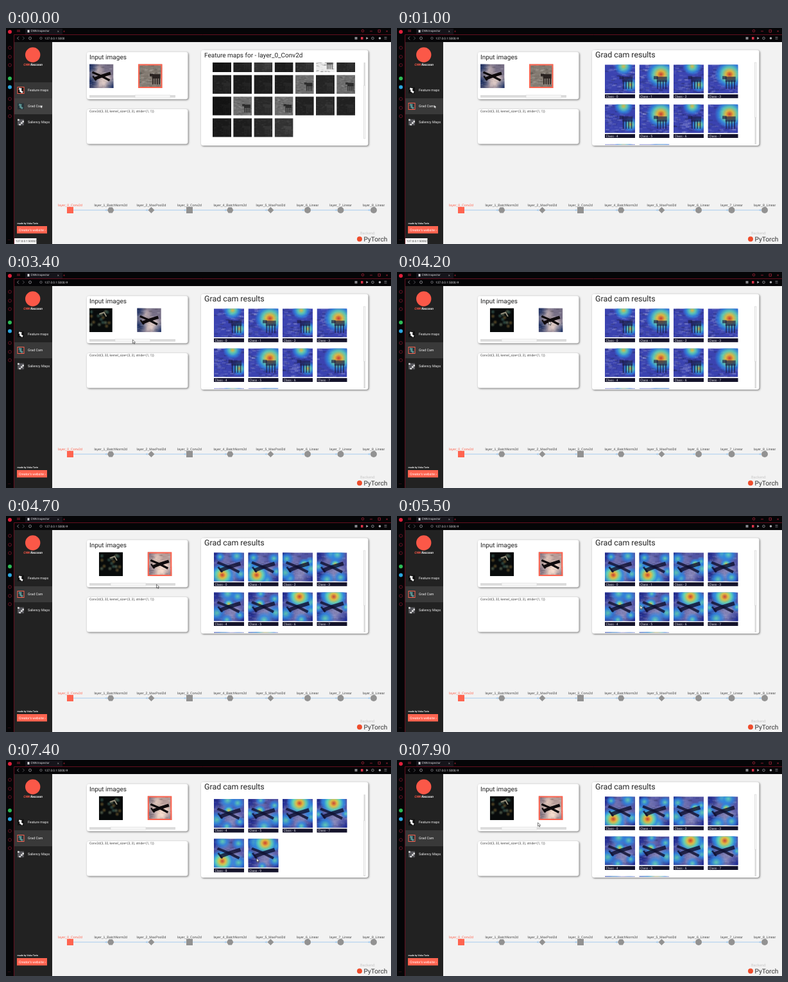
An HTML page with a canvas for the animation above (8000 ms loop, 600 px wide and 338 px high).

```html
<!DOCTYPE html>
<html lang="en">
<head>
<meta charset="utf-8">
<title>CNN Inspector</title>
<style>
html, body { margin: 0; width: 100%; height: 100%; overflow: hidden; background: #000; }
canvas { display: block; }
</style>
</head>
<body>
<canvas id="stage" width="600" height="338"></canvas>
<script>
const c = document.getElementById('stage').getContext('2d');
const LOOP = 8000, RED = '#ff6450';
const ROBOTO = 'Roboto, sans-serif', ARIAL = '"Liberation Sans", sans-serif';
const OPEN_RESULTS = 500, DRAG_START = 2600, DRAG_END = 3700, PICK_PLANE = 4250;
const JET = ['#e53a1c', '#f8cb30', '#62dcb4', '#2f86e0'];

// Keyframes: time followed by values
const cursorKeys = [[0, 55, 123], [900, 55, 123], [2000, 226, 126], [DRAG_START, 230, 109],
  [DRAG_END, 192, 109], [4200, 238, 80], [4700, 236, 110], [5700, 397, 147], [7500, 392, 157], [7900, 221, 101]];
const scrollKeys = [[5700, 0], [6050, 58.5], [7450, 58.5], [7700, 0]];

function at(keys, t) {
  const i = keys.findIndex(k => t < k[0]);
  if (i < 1) return keys.at(i).slice(1);
  const a = keys[i - 1], b = keys[i];
  const p = (t - a[0]) / (b[0] - a[0]), e = p * p * (3 - 2 * p);
  return a.slice(1).map((v, j) => v + (b[j + 1] - v) * e);
}

function seeded(seed) {
  let s = seed * 99733 + 1234567;
  return () => (s = s * 16807 % 2147483647) / 2147483647;
}

function rect(x, y, w, h, color) { c.fillStyle = color; c.fillRect(x, y, w, h); }

function frame(x, y, w, h, color, width) {
  c.strokeStyle = color; c.lineWidth = width; c.strokeRect(x, y, w, h);
}

function text(s, x, y, size, color, font = ROBOTO, align = 'left', style = '') {
  c.font = `${style} ${size}px ${font}`;
  c.textAlign = align;
  c.fillStyle = color;
  c.fillText(s, x, y);
}

function dot(x, y, r, color) {
  c.beginPath(); c.arc(x, y, r, 0, 7); c.fillStyle = color; c.fill();
}

function ring(x, y, r, color) {
  c.beginPath(); c.arc(x, y, r, 0, 7); c.strokeStyle = color; c.lineWidth = .7; c.stroke();
}

function line(color, width, ...p) {
  c.beginPath();
  for (let i = 0; i < p.length; i += 2) c.lineTo(p[i], p[i + 1]);
  c.strokeStyle = color; c.lineWidth = width; c.stroke();
}

function polygon(x, y, r, sides, color) {
  c.beginPath();
  for (let a = 0; a < sides; a++) c.lineTo(x + r * Math.cos(a * 2 * Math.PI / sides), y + r * Math.sin(a * 2 * Math.PI / sides));
  c.fillStyle = color; c.fill();
}

function clip(x, y, w, h, draw) {
  c.save(); c.beginPath(); c.rect(x, y, w, h); c.clip(); draw(); c.restore();
}

function glow(x, y, r, colors) {
  const g = c.createRadialGradient(x, y, 0, x, y, r);
  colors.forEach((k, i) => g.addColorStop(i / colors.length, k));
  g.addColorStop(1, colors.at(-1).slice(0, 7) + '00');
  rect(x - r, y - r, 2 * r, 2 * r, g);
}

function card(x, y, w, h) {
  c.save();
  c.shadowColor = '#0008'; c.shadowBlur = 3; c.shadowOffsetX = c.shadowOffsetY = 1;
  c.beginPath(); c.roundRect(x, y, w, h, 3.5); c.fillStyle = '#fff'; c.fill();
  c.restore();
}

function scrollbar(x, y, w, h, tx, ty, tw, th) {
  rect(x, y, w, h, '#dcdcdc');
  rect(tx, ty, tw, th, '#f7f7f7');
  frame(tx, ty, tw, th, '#d0d0d0', .5);
}

// Pictures fill the unit square, scaled to the box they stand in
function picture(x, y, w, h, draw) {
  clip(x, y, w, h, () => { c.translate(x, y); c.scale(w, h); draw(); });
}

function grain(seed, strength) {
  const rnd = seeded(seed);
  for (let i = 0; i < 140; i++) {
    const shade = rnd() < .5 ? 0 : 255;
    rect(rnd() - .05, rnd() - .02, .12, .05, `rgba(${shade},${shade},${shade},${rnd() * strength})`);
  }
}

function clouds(color, shade) {
  const rnd = seeded(4);
  for (let i = 0; i < 9; i++) glow(.15 + rnd() * .8, .15 + rnd() * .8, .3, [color + 'a0', color + '60']);
  for (const [x, y] of [[0, .1], [.05, .75], [1, .95]]) glow(x, y, .4, [shade, shade + '90']);
  grain(3, .12);
}

function planeShape(color) {
  line(color, .13, .2, .62, .5, .5, .88, .38);
  line(color, .09, .12, .34, .5, .5, .84, .68);
  line(color, .06, .14, .5, .28, .68);
}

function dogShape(color) {
  rect(.58, .42, .34, .18, color);
  rect(.48, .4, .14, .11, color);
  for (let i = 0; i < 4; i++) rect(.59 + i * .09, .55, .045, .3, color);
}

const photos = {
  plane(picked) {
    rect(0, 0, 1, 1, picked ? '#b79c98' : '#776f86');
    clouds(picked ? '#ffe4d4' : '#ead4cc', picked ? '#7f7080' : '#182d62');
    planeShape('#0f0b0d');
  },
  dog() {
    rect(0, 0, 1, 1, '#857c73');
    grain(8, .16);
    dogShape('#2a2321');
  },
  dark() {
    const rnd = seeded(12), hues = ['#40695f', '#7a6434', '#6d7d64'];
    rect(0, 0, 1, 1, '#080b0b');
    for (let i = 0; i < 15; i++) glow(.1 + rnd() * .8, .08 + rnd() * .7, .1, [hues[i % 3] + 'b0']);
    line('#97927f', .05, .45, .25, .65, .18, .75, .35);
  }
};

// Even dog classes have two small spots, odd ones a single large spot
function dogSpots(n) {
  return n % 2 ? [[.72, .34, .5, 3]] : [[.62, .06, .32, 2], [.84, .7, .26, 2]];
}

// Plane classes share faint spots on the rim; the outer classes also run hot
function planeSpots(n) {
  const rnd = seeded(n + 5), spots = [];
  for (let i = 0; i < 5; i++) {
    const a = i * 1.26 + rnd();
    spots.push([.5 + .46 * Math.cos(a), .5 + .46 * Math.sin(a), .16 + rnd() * .16, 1]);
  }
  if (n > 1 && n < 6) spots.push([.3 + rnd() * .6, .4, .2, 2]);
  else spots.push(n < 2 || n === 8 ? [.28, .78, .42, 3] : [.56, .15, .44, 3]);
  return spots;
}

function heatmap(x, y, n, plane) {
  picture(x, y, 47, 45, () => {
    rect(0, 0, 1, 1, plane ? '#5254a4' : '#3b43b0');
    if (plane) clouds('#8a8abc', '#1c2890');
    else grain(n + 20, .16);
    for (const [sx, sy, r, heat] of plane ? planeSpots(n) : dogSpots(n))
      glow(sx, sy, r, JET.slice(3 - heat).map(k => k + 'd8'));
    if (plane) planeShape('#101030d0');
    else dogShape('#1c1c48b0');
  });
  rect(x, y + 46.5, 47, 6, '#14132b');
  text('Class - ' + n, x + 1.5, y + 51.3, 5, '#e8e8ee');
}

function featureMaps() {
  const rnd = seeded(2);
  text('Feature maps for - layer_0_Conv2d', 309, 46, 10, '#222');
  clip(318, 54, 240, 120, () => {
    for (let i = 0; i < 25; i++) {
      const bright = i > 10 && i < 18 && i % 2;
      const v = i === 5 ? 235 : bright ? 110 : 10 + rnd() * 42;
      const tone = k => `rgb(${k},${k},${k})`;
      picture(322 + i % 7 * 32.2, 39.5 + Math.floor(i / 7) * 33.9, 29, 29.5, () => {
        rect(0, 0, 1, 1, tone(v));
        grain(i + 40, v / 900);
        dogShape(tone(v > 70 ? v * .4 : v * 1.3));
      });
    }
  });
  scrollbar(557.5, 54, 2.5, 119, 557.5, 90, 2.5, 83);
}

function gradCam(t) {
  const [scroll] = at(scrollKeys, t);
  text('Grad cam results', 309, 46, 12.4, '#222');
  clip(318, 54, 240, 128.5, () => {
    for (let n = 0; n < 10; n++)
      heatmap(324 + n % 4 * 53.5, 57.3 + Math.floor(n / 4) * 62.2 - scroll, n, t >= PICK_PLANE);
  });
  scrollbar(557.5, 54, 2.5, 128, 557.5, 54 + scroll * .7, 2.5, 86);
}

function inputs(t) {
  const grabbed = Math.min(Math.max(t, DRAG_START), DRAG_END);
  const drag = 230 - at(cursorKeys, grabbed)[0], planeOn = t >= PICK_PLANE;
  card(126, 37.5, 157.5, 74);
  text('Input images', 130, 49, 10, '#222');
  clip(130, 54, 134, 44, () => ['dark', 'plane', 'dog'].forEach((name, i) => {
    const x = 54 + i * 76 + drag * 2.39, on = name === (planeOn ? 'plane' : 'dog');
    picture(x, 56.5, 37.5, 37.5, () => photos[name](on));
    if (on) frame(x + 1, 57.5, 35.5, 35.5, RED, 2);
  }));
  scrollbar(130, 105, 134, 4, 201 - drag, 105, 55, 4);
  card(126, 127, 157.5, 54.5);
  text('Conv2d(3, 32, kernel_size=(3, 3), stride=(1, 1))', 130, 132.2, 5, '#444');
}

function browser(opened) {
  const dim = '#7d1426', red = '#c02840', gray = '#b5b5ba';
  rect(0, 0, 600, 338, '#050507');
  rect(30, 1, 58, 9, '#15141a');
  line(dim, .8, 12.5, 338, 12.5, 10.5, 600, 10.5);
  line(red, .7, 17, 3.5, 22, 3.5);
  line(red, .7, 17, 5.5, 22, 5.5);
  rect(33.5, 3, 3, 4, '#d5d5d8');
  text('CNN Inspector', 38.5, 6.4, 4.5, '#e2e2e5');
  text('×', 80, 6.6, 5, '#bbb');
  text('+', 89, 6.8, 5.5, red);
  line(gray, .7, 20, 13.5, 17.5, 16, 20, 18.5);
  line('#77777c', .7, 26, 13.5, 28.5, 16, 26, 18.5);
  ring(37.5, 16, 2, gray);
  ring(54.5, 16, 1.7, '#8d8d92');
  text('127.0.0.1:5000' + (opened ? '/#' : ''), 60.3, 17.7, 4.7, '#dedee2');
  rect(543.5, 14, 4, 4, '#85858a');
  rect(553, 14, 3.5, 4, '#d83247');
  polygon(562.5, 16, 2.2, 3, gray);
  ring(571.5, 16, 1.8, gray);
  dot(582.5, 16, 1.8, gray);
  for (const y of [14.5, 17]) line(gray, .7, 589.5, y, 593.5, y);
  ring(556, 4.5, 1.8, red);
  line(red, .7, 567, 5, 571, 5);
  frame(580, 3, 3.5, 3.5, red, .7);
  text('×', 592, 7, 6, red);
  dot(6, 6, 3, '#e0203c');
  for (const y of [31, 45, 58, 111, 125, 138]) ring(6, y, 2.4, '#8e1b30');
  dot(6, 79, 3, '#2dbb55');
  dot(6, 92.5, 3, '#2aa5df');
  text('…', 3, 331.5, 6, red);
}

function sidebar(opened) {
  rect(13, 22, 59, 316, '#222');
  dot(41.7, 42, 11.7, '#fb5848');
  text('CNN', 27.3, 59.4, 4.9, '#fb5848', ROBOTO, 'left', 'italic bold');
  text('Raccoon', 56.8, 59.4, 4.9, '#fff', ROBOTO, 'right', 'italic bold');
  if (!opened) rect(13, 85, 59, 25, '#373737');
  rect(13, 110, 59, 25, opened ? '#393939' : '#414141');
  ['Feature maps', 'Grad Cam', 'Saliency Maps'].forEach((label, i) => {
    const y = 97.5 + i * 25;
    picture(18, y - 5, 10, 10, () => {
      rect(0, 0, 1, 1, ['#111', '#26343a', '#55555a'][i]);
      if (i < 2) line(i ? '#5c9290' : '#eee', .28, .2, .25, .5, .3, .45, .6, .8, .85);
      else for (let k = 0; k < 8; k++) rect(k % 4 * .25, k * 3 % 4 * .25, .25, .25, '#d8d8d8');
    });
    if (i === +opened) frame(18, y - 5, 10, 10, RED, 1);
    text(label, 34, y + 1.6, 5.3, '#f4f4f4');
  });
  text('made by Vuka Tarin', 17.5, 306.5, 3.7, '#eee', ROBOTO, 'left', 'bold');
  rect(17, 310, 47, 11.5, RED);
  text("Creator's website ›", 20, 317.7, 5.1, '#fff');
}

const nodes = {
  Conv2d: (x, color) => rect(x - 5, 280, 10, 10, color),
  BatchNorm2d: (x, color) => polygon(x, 285, 5.2, 6, color),
  MaxPool2d: (x, color) => polygon(x, 285, 5, 4, color),
  Linear: (x, color) => dot(x, 285, 5, color)
};

function network() {
  const kinds = ['Conv2d', 'BatchNorm2d', 'MaxPool2d'];
  line('#a5cbed', 1, 100, 285, 573, 285);
  for (let i = 0; i < 9; i++) {
    const kind = i < 6 ? kinds[i % 3] : 'Linear', color = i ? '#929292' : RED;
    const x = i < 6 ? 100 + Math.floor(i / 3) * 186 + i % 3 * 63.2 : 470 + (i - 6) * 51.5;
    if (i) polygon(x - 7, 285, -2, 3, '#a5cbed');
    nodes[kind](x, color);
    text(`layer_${i}_${kind}`, x, 279, 5.2, i ? '#444' : RED, ARIAL, 'center');
  }
  text('Backend:', 552, 323, 5.8, '#c9c9c9');
  dot(551, 330.3, 4, '#ee4c2c');
  text('PyTorch', 557.4, 334.2, 10.2, '#333');
}

function pointer(t) {
  const [x, y] = at(cursorKeys, t);
  c.beginPath();
  [[0, 0], [0, 5.8], [1.4, 4.5], [2.4, 6.6], [3.3, 6.2], [2.4, 4.2], [4.2, 4.1]]
    .forEach(([dx, dy]) => c.lineTo(x - 1.5 + dx, y - 3 + dy));
  c.closePath();
  c.fillStyle = '#fff'; c.fill();
  c.strokeStyle = '#222'; c.lineWidth = .6; c.stroke();
}

function draw(t) {
  const opened = t >= OPEN_RESULTS;
  browser(opened);
  rect(72, 22, 528, 316, '#f2f2f2');
  sidebar(opened);
  inputs(t);
  card(304, 34.5, 260.5, 149.5);
  if (opened) gradCam(t); else featureMaps();
  network();
  if (t < 1200) {
    rect(13, 329, 34.5, 9, '#f6f6f6');
    text('127.0.0.1:5000/#', 15, 335.2, 4.5, '#444');
  }
  pointer(t);
}

c.textRendering = 'geometricPrecision';
const start = performance.now();
function tick() {
  draw((performance.now() - start) % LOOP);
  requestAnimationFrame(tick);
}
tick();
</script>
</body>
</html>
```
